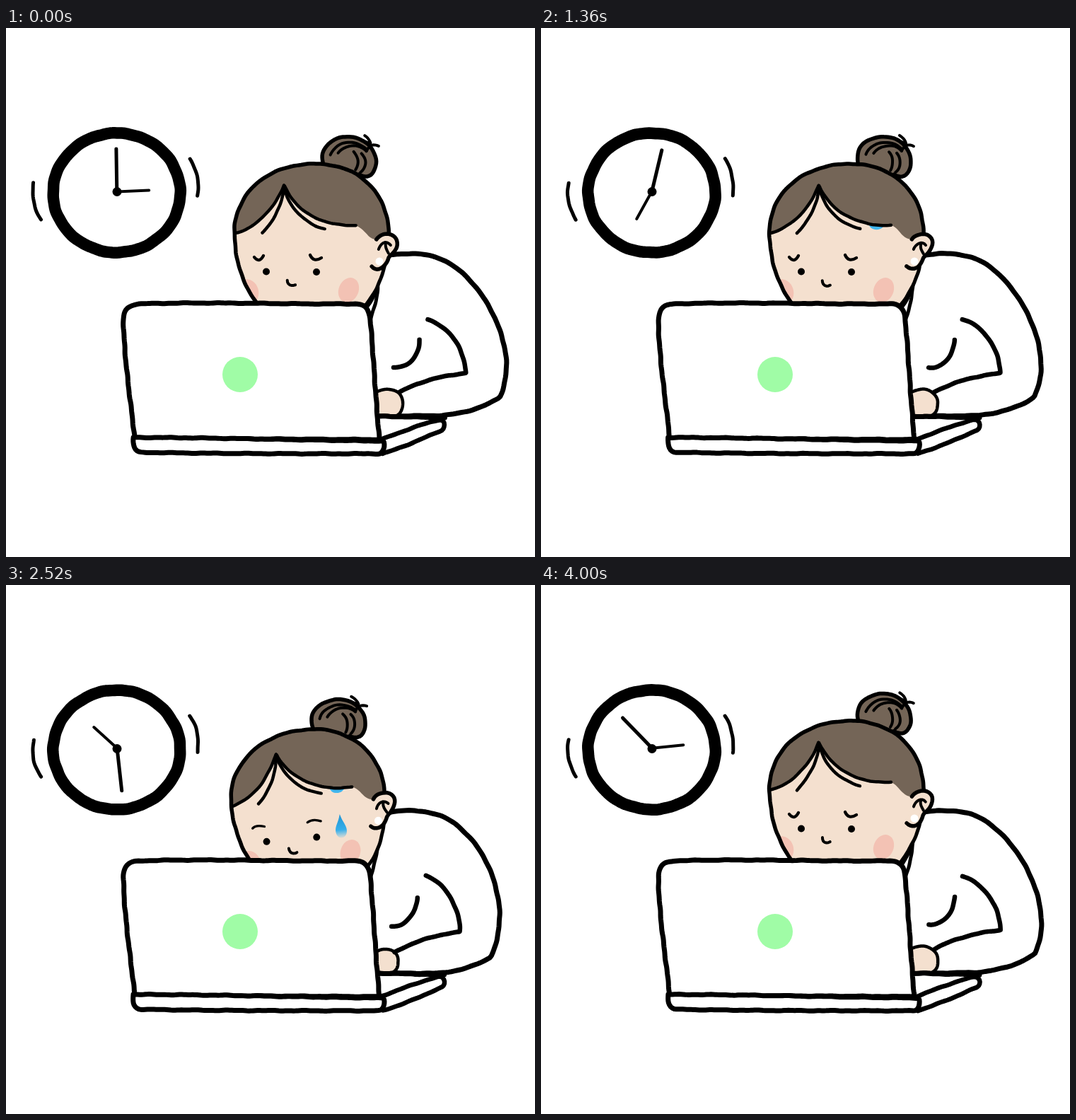
An HTML page with a canvas that plays this animation: 748 by 748 pixels, repeating every 4040 ms.

```html
<!DOCTYPE html>
<html lang="en">
<head>
<meta charset="utf-8">
<title>Overtime</title>
<style>
html, body { margin: 0; width: 100%; height: 100%; overflow: hidden; background: #fff; }
canvas { display: block; width: 100vmin; height: 100vmin; }
</style>
</head>
<body>
<canvas id="stage" width="748" height="748"></canvas>
<script>
const LOOP = 4040, STEP = 40, SIZE = 748;
const INK = '#000', SKIN = '#f4e0cf', HAIR = '#746557', BLUSH = '#f3c2b4', GREEN = '#a0fca6';
const ctx = document.getElementById('stage').getContext('2d');
const probe = document.createElementNS('http://www.w3.org/2000/svg', 'path');
const cache = new Map();
let boil = 0;

const mix = (a, b, k) => a + (b - a) * k;

// Evenly spaced points along an SVG path string
function points(d, count) {
  const key = d + count;
  if (!cache.has(key)) {
    probe.setAttribute('d', d);
    const len = probe.getTotalLength();
    const n = count || Math.max(6, Math.ceil(len / 3));
    cache.set(key, Array.from({ length: n + 1 }, (_, i) => {
      const p = probe.getPointAtLength(len * i / n);
      return [p.x, p.y];
    }));
  }
  return cache.get(key);
}

const blend = (a, b, k) => {
  const q = points(b, 120);
  return points(a, 120).map((p, i) => [mix(p[0], q[i][0], k), mix(p[1], q[i][1], k)]);
};

// Hand-drawn unevenness that shifts with every redraw
function wobble([x, y]) {
  const k = boil * 2.1;
  return [
    x + 0.3 * Math.sin(y * 0.13 + x * 0.04 + k) + 0.18 * Math.sin(y * 0.31 - k * 1.7),
    y + 0.3 * Math.sin(x * 0.12 - y * 0.05 + k * 1.3) + 0.18 * Math.sin(x * 0.29 + k)
  ];
}

function trace(shape) {
  const list = typeof shape === 'string' ? points(shape) : shape;
  ctx.beginPath();
  for (const p of list) ctx.lineTo(...wobble(p));
}

function fill(shape, color) {
  trace(shape);
  ctx.fillStyle = color;
  ctx.fill();
}

function line(shape, width) {
  trace(shape);
  ctx.lineWidth = width;
  ctx.strokeStyle = INK;
  ctx.stroke();
}

function oval(x, y, rx, ry, color, turn = 0) {
  ctx.beginPath();
  ctx.ellipse(x, y, rx, ry, turn, 0, 7);
  ctx.fillStyle = color;
  ctx.fill();
}

// Piecewise linear value over [time, value] pairs
function track(keys, t) {
  for (let i = 1; i < keys.length; i++) {
    const [t0, a] = keys[i - 1], [t1, b] = keys[i];
    if (t <= t1) return mix(a, b, (t - t0) / (t1 - t0));
  }
  return keys[keys.length - 1][1];
}

const TILT = [[0, 0], [1720, 0], [1920, 1], [3120, 1], [3320, 0], [LOOP, 0]];
const LEAN = [[0, 0], [520, 0.1], [1360, 0.05], [1760, 0], [1960, 0.8], [2960, 1], [3480, 0.65], [3920, 0.5], [3960, 0], [LOOP, 0]];
const BROW = [[0, 0], [240, 0], [440, 1], [840, 1], [1100, 0], [1960, 0], [2200, 1], [3020, 1], [3300, 0], [LOOP, 0]];
const DROPS = [[44, 700], [430, 700], [830, 520], [1240, 850], [2000, 700], [2410, 700], [2806, 700], [3370, 580]];

function hand(turn, length, width) {
  const a = turn * Math.PI * 2;
  line([[157, 231], [157 + Math.sin(a) * length, 231 - Math.cos(a) * length]], width);
}

function clock(t) {
  const ring = Array.from({ length: 181 }, (_, i) => {
    const a = i / 90 * Math.PI;
    return [156.5 + 90 * Math.cos(a), 233 + 84.5 * Math.sin(a)];
  });
  line(ring, 16.5);
  line('M39 219C36 239 39 255 49.5 271', 5);
  line('M260 185C271 201 273 219 271 237', 5);
  hand(t / LOOP * 12 - 0.003, 60, 5);
  hand(t / LOOP + 0.244, 45, 4);
  oval(157, 231.5, 6.5, 6.5, INK);
}

function body(s) {
  line(blend('M543 321C593 314 622 326 640 342C680 375 703 427 707 465C709 490 705 508 698 522C672 539 645 545 615 548L529 549',
    'M543 321C593 314 622 326 640 342C678 372 695 422 697 460C698 490 691 510 685 526C665 539 640 546 612 549L529 549', s), 7);
  const fist = blend('M525 514C545 505 562 515 561 532C561 542 557 546 552 548L525 548',
    'M525 518C540 511 556 519 554 534C554 542 549 547 545 548L525 548', s);
  fill(fist, SKIN);
  line(fist, 4.5);
  line(blend('M556 515C585 499 620 491 650 488C649 457 629 422 596 412',
    'M549 520C580 502 612 494 641 491C642 459 622 422 594 411', s), 6.5);
  line(blend('M548 480C566 482 584 466 585 441', 'M545 483C563 484 580 467 581 442', s), 6.5);
  line('M528 549L620 551', 7);
  line('M526 364C525 382 520 398 515 414', 5);
  line('M526 366C520 382 515 390 508 398', 4);
}

function drop(t, [start, span]) {
  const p = (t - start) / span;
  if (p <= 0 || p >= 1) return;
  const y = 250.5 + 133 * Math.pow(p, 2.4), w = 12 - 5.5 * p, x = 474.5;
  const g = ctx.createLinearGradient(0, y, 0, y + 34);
  g.addColorStop(0, '#1f94d2');
  g.addColorStop(0.65, '#35aeea');
  g.addColorStop(1, 'rgba(70,185,238,' + (p < 0.4 ? 1 : 0.1) + ')');
  ctx.globalAlpha = Math.min(1, (1 - p) / 0.04);
  ctx.beginPath();
  ctx.moveTo(x, y);
  ctx.bezierCurveTo(x + w * 0.4, y + 12, x + w, y + 16, x + w, y + 23);
  ctx.bezierCurveTo(x + w, y + 37, x - w, y + 37, x - w, y + 23);
  ctx.bezierCurveTo(x - w, y + 16, x - w * 0.4, y + 12, x, y);
  ctx.fillStyle = g;
  ctx.fill();
  ctx.globalAlpha = 1;
}

function brow(worried, arched, k) {
  const [a, b, c] = worried.map((p, i) => [mix(p[0], arched[i][0], k), mix(p[1], arched[i][1], k)]);
  ctx.beginPath();
  ctx.moveTo(...a);
  ctx.quadraticCurveTo(...b, ...c);
  ctx.lineWidth = mix(4.3, 3.3, k);
  ctx.strokeStyle = INK;
  ctx.stroke();
}

function bun() {
  const ball = 'M451 198C437 168 465 151 490 154C519 159 529 186 520 202C516 211 508 212 499 207';
  fill(ball, HAIR);
  line(ball, 5.5);
  line('M459 179C466 162 490 154 510 171', 4);
  line('M470 177C479 165 499 162 510 174', 4);
  line('M492 175C500 184 498 195 494 201', 4);
  line('M503 177C511 186 509 198 501 204', 4);
  line('M507 152C512 155 515 160 516 164L509 161', 4);
  line('M510 174C514 165 520 164 527 167', 4);
}

function head(t) {
  const face = 'M323 290C322 238 365 193 435 192C500 191 541 235 541 292C538 335 525 372 503 398L358 398C335 364 324 332 323 290Z';
  ctx.save();
  ctx.translate(561, 348);
  ctx.rotate(-0.095 * track(TILT, t));
  ctx.translate(-561, -348);
  bun();
  fill(face, SKIN);

  ctx.save();
  trace(face);
  ctx.clip();
  oval(342, 373, 15, 18, BLUSH, -0.3);
  oval(484.5, 370.5, 14, 18, BLUSH, 0.4);
  for (const d of DROPS) drop(t, d);
  ctx.restore();

  fill('M324 290C355 282 380 255 393 222C410 262 450 280 495 279C508 284 511 299 523 299L541 292C541 235 500 191 435 192C365 193 322 238 324 290Z', HAIR);
  line('M508 392C525 372 532 351 536 334', 5);
  line('M358 394C335 364 324 332 323 290C322 238 365 193 435 192C500 191 541 235 541 290', 5.5);
  line('M325 290C355 282 380 255 393 222C410 262 450 281 495 279', 4.5);
  line('M393 223C392 247 380 272 362 290', 4.5);
  line('M393 223C398 254 424 278 451 284', 4.5);

  const ear = 'M524 299C530 289 549 288 553 300C556 311 546 320 541 324C537 340 524 345 517 337';
  fill(ear, SKIN);
  line(ear, 5.5);
  line('M527 313C530 304 538 300 544 307', 4);
  line('M537 305C536 311 539 315 541 319', 4);
  oval(528, 330, 5.5, 5.5, '#fff');

  const k = track(BROW, t);
  brow([[351, 324], [358, 333], [364, 322]], [[350, 324], [355, 319], [367, 323]], k);
  brow([[430, 321], [435, 332], [446, 325]], [[428, 323], [436, 318], [447, 323]], k);
  oval(368, 344.5, 5, 5, INK);
  oval(439, 345, 5, 5, INK);
  line('M398 357C398 364 404 366 409 363.5', 4);
  ctx.restore();
}

function laptop() {
  const side = 'M530 582C555 573 580 562 612 554C622 553 622 566 616 569C590 580 565 592 532 602Z';
  fill(side, '#fff');
  line(side, 6.5);
  const lid = 'M182 580C177 532 167 470 166 414C166 398 172 391 190 390C290 387 400 391 493 390C508 390 513 397 515 412C520 468 523 530 528 582Z';
  fill(lid, '#fff');
  line(lid, 7);
  const base = 'M180 579C295 579 420 583 534 584C537 592 533 602 527 602C415 602 300 602 190 600C180 598 179 588 180 579Z';
  fill(base, '#fff');
  line(base, 7);
  oval(331, 490, 25, 25, GREEN);
}

function draw(now) {
  const t = Math.floor(now % LOOP / STEP) * STEP;
  boil = Math.floor(t / 80);
  ctx.fillStyle = '#fff';
  ctx.fillRect(0, 0, SIZE, SIZE);
  ctx.lineCap = ctx.lineJoin = 'round';
  clock(t);
  body(track(LEAN, t));
  head(t);
  laptop();
}

const begin = performance.now();
function tick() {
  draw(performance.now() - begin);
  requestAnimationFrame(tick);
}
tick();
</script>
</body>
</html>
```
